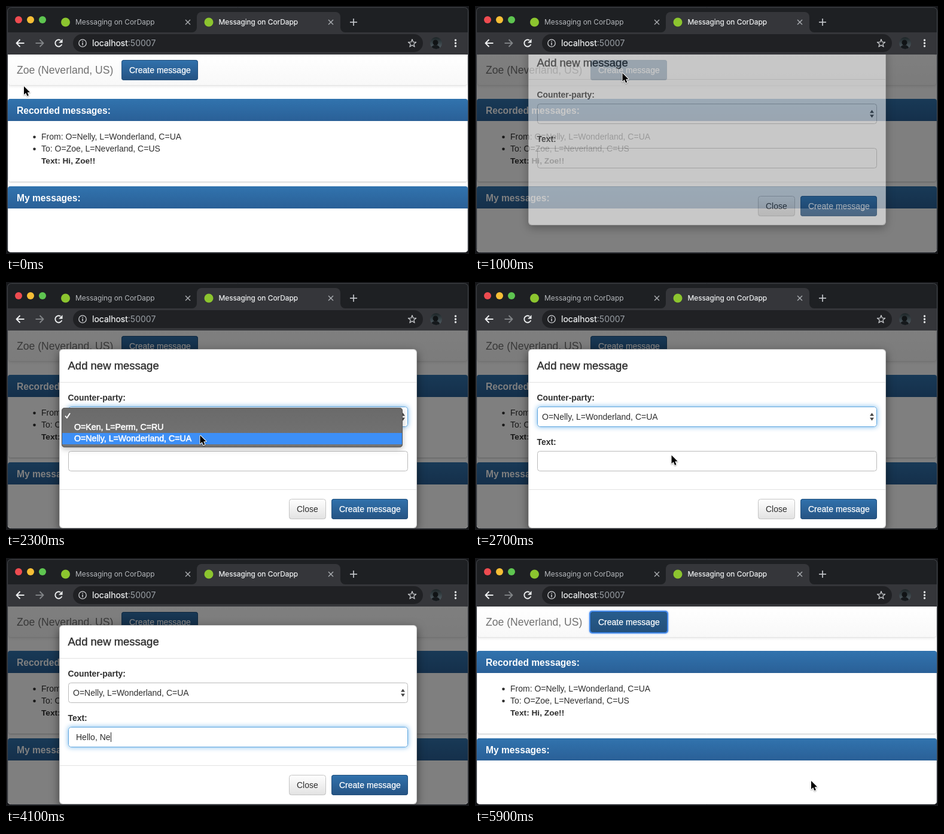
Animation, 774 px wide and 414 px high, one loop 8000 ms. Source, as an HTML page with a canvas:

```html
<!DOCTYPE html>
<html lang="en">
<head>
<meta charset="utf-8">
<title>Messaging</title>
<style>
html, body { margin: 0; width: 100%; height: 100%; overflow: hidden; background: #17181b; }
canvas { display: block; }
</style>
</head>
<body>
<canvas id="stage" width="774" height="414"></canvas>
<script>
const W = 774, H = 414, LOOP = 8000, STEP = 100;
const stage = document.getElementById('stage').getContext('2d');
// Extra height keeps the dialog's shadow whole while it slides
const layer = document.createElement('canvas');
layer.width = W;
layer.height = H + 40;
const overlay = layer.getContext('2d');
let g = stage;

const SANS = '"Liberation Sans", Arial, sans-serif';
const UI = 'Inter, Roboto, sans-serif';
const INK = '#2e2e2e';
const TITLE = 'Messaging on CorDapp';
const PARTIES = ['', 'O=Ken, L=Perm, C=RU', 'O=Nelly, L=Wonderland, C=UA'];
const MESSAGE = 'Hello, Nelly!';
const KEY_TIMES = [3100, 3300, 3400, 3500, 3700, 3800, 3900, 4000, 4100, 4200, 4300, 4500, 4500];

// Pointer path: time, x, y
const PATH = [
  [100, 30, 134], [800, 246.5, 112], [1000, 246.5, 112], [1400, 325.5, 231],
  [1900, 325.5, 231], [2200, 324.5, 256], [2500, 324.5, 256], [2800, 330, 301],
  [5000, 330, 301], [5300, 562, 372]
];

const clamp = v => Math.max(0, Math.min(1, v));
const smooth = p => p * p * (3 - 2 * p);
const easeOut = p => 1 - Math.pow(1 - p, 1.55);

function pointer(t) {
  const i = PATH.findIndex(k => k[0] > t);
  if (i === 0) return PATH[0].slice(1);
  if (i < 0) return PATH[PATH.length - 1].slice(1);
  const [a, b] = [PATH[i - 1], PATH[i]];
  const p = smooth((t - a[0]) / (b[0] - a[0]));
  return [a[1] + (b[1] - a[1]) * p, a[2] + (b[2] - a[2]) * p];
}

function text(s, x, y, font, color, weight = 0) {
  g.font = font;
  g.fillStyle = color;
  g.fillText(s, x, y);
  if (weight) {
    g.strokeStyle = color;
    g.lineWidth = weight;
    g.lineJoin = 'round';
    g.strokeText(s, x, y);
  }
}

function box(x, y, w, h, r, fill, border) {
  if (fill) {
    g.beginPath();
    g.roundRect(x, y, w, h, r);
    g.fillStyle = fill;
    g.fill();
  }
  if (border) {
    g.beginPath();
    g.roundRect(x + 0.5, y + 0.5, w - 1, h - 1, r);
    g.strokeStyle = border;
    g.lineWidth = 1;
    g.stroke();
  }
}

function shadowed(color, blur, dy, paint) {
  g.save();
  g.shadowColor = color;
  g.shadowBlur = blur;
  g.shadowOffsetY = dy;
  paint();
  g.restore();
}

function fade(y, h, top, bottom) {
  const f = g.createLinearGradient(0, y, 0, y + h);
  f.addColorStop(0, top);
  f.addColorStop(1, bottom);
  return f;
}

function disc(x, y, r, color) {
  g.beginPath();
  g.arc(x, y, r, 0, Math.PI * 2);
  g.fillStyle = color;
  g.fill();
}

function line(color, width, ...pts) {
  g.beginPath();
  pts.forEach(([x, y]) => g.lineTo(x, y));
  g.strokeStyle = color;
  g.lineWidth = width;
  g.stroke();
}

function shape(color, ...pts) {
  g.beginPath();
  pts.forEach(([x, y]) => g.lineTo(x, y));
  g.closePath();
  g.fillStyle = color;
  g.fill();
}

function tab(x, closeX, active) {
  disc(x, 27, 7.5, '#8cc52f');
  text(TITLE, x + 16.5, 31, '11.9px ' + UI, active ? '#f1f3f4' : '#b4b7bb', active ? 0.2 : 0);
  line('#a9acb0', 1.4, [closeX - 4, 23], [closeX + 4, 31]);
  line('#a9acb0', 1.4, [closeX + 4, 23], [closeX - 4, 31]);
}

function arrow(x, dir, color) {
  line(color, 1.9, [x - 6.5 * dir, 62], [x + 6.5 * dir, 62]);
  line(color, 1.9, [x + 0.5 * dir, 56], [x + 6.5 * dir, 62], [x + 0.5 * dir, 68]);
}

function star(cx, cy) {
  g.beginPath();
  for (let i = 0; i < 10; i++) {
    const r = i % 2 ? 2.9 : 6.9, a = Math.PI * (i / 5 - 0.5);
    g.lineTo(cx + r * Math.cos(a), cy + r * Math.sin(a));
  }
  g.closePath();
  g.strokeStyle = '#c8cacd';
  g.lineWidth = 1.3;
  g.stroke();
}

function avatar(cx, cy) {
  g.save();
  g.beginPath();
  g.arc(cx, cy, 10, 0, Math.PI * 2);
  g.clip();
  g.fillStyle = fade(cy - 10, 20, '#1c2426', '#56636a');
  g.fillRect(cx - 10, cy - 10, 20, 20);
  disc(cx - 1, cy - 1, 4.5, '#101315');
  disc(cx - 1, cy + 11, 8, '#15191c');
  g.restore();
}

function browser() {
  g.fillStyle = '#17181b';
  g.fillRect(0, 0, W, H);
  box(2, 2, 771, 410, 6, '#1e2023', '#45484d');
  g.fillStyle = '#35363a';
  g.fillRect(3, 44, 769, 37);
  shape('#35363a', [311, 44], [319, 36], [559, 36], [567, 44]);
  disc(311, 36, 8, '#1e2023');
  disc(567, 36, 8, '#1e2023');
  box(319, 10, 240, 34, [8, 8, 0, 0], '#35363a');
  ['#ee4b50', '#f6be36', '#5ec550'].forEach((c, i) => disc(21 + 20 * i, 23, 6, c));
  tab(99.5, 304, false);
  tab(339, 543, true);
  line('#c3c6ca', 1.7, [575, 27], [587, 27]);
  line('#c3c6ca', 1.7, [581, 21], [581, 33]);

  arrow(24, -1, '#f1f3f4');
  arrow(56, 1, '#818487');
  g.beginPath();
  g.arc(88, 62, 5.7, 0.35, 5.3);
  g.strokeStyle = '#f1f3f4';
  g.lineWidth = 1.9;
  g.stroke();
  shape('#f1f3f4', [94.5, 55], [94.5, 61.5], [88, 61.5]);

  box(112, 47, 585, 30, 15, '#202124');
  g.beginPath();
  g.arc(128, 62, 6.2, 0, Math.PI * 2);
  g.strokeStyle = '#d0d2d5';
  g.lineWidth = 1.3;
  g.stroke();
  g.fillStyle = '#d0d2d5';
  g.fillRect(127.3, 61, 1.5, 4.5);
  g.fillRect(127.3, 58.3, 1.5, 1.6);
  const font = '14px ' + UI;
  text('localhost', 144, 67, font, '#f1f3f4', 0.2);
  text(':50007', 144 + g.measureText('localhost').width, 67, font, '#9aa0a6');
  star(679, 62.5);
  avatar(719, 62);
  [57, 62, 67].forEach(y => disc(751.5, y, 1.7, '#eceef0'));
}

function primary(x, y, dark) {
  const fill = dark ? fade(y, 34, '#275d8d', '#234f7a') : fade(y, 34, '#3172ad', '#255383');
  box(x, y, 128, 34, 4, fill, '#23507c');
  text('Create message', x + 13, y + 22, '14px ' + SANS, '#fff', 0.25);
}

function panel(y, h, title) {
  shadowed('rgba(0,0,0,.12)', 2, 1, () => box(3, y, 769, h, 4, '#fff'));
  box(3, y, 769, h, 4, null, '#d6d8da');
  box(3, y, 769, 37, [4, 4, 0, 0], fade(y, 37, '#3173ae', '#2a6097'));
  text(title, 18, y + 25, 'bold 15.6px ' + SANS, '#fff');
}

function page(t) {
  g.fillStyle = '#fff';
  g.fillRect(0, 81, W, 333);
  shadowed('rgba(0,0,0,.1)', 4, 1, () => box(3, 81, 769, 52, 4, fade(81, 52, '#fff', '#f8f8f8')));
  box(3, 80, 769, 53, 4, null, '#e4e4e4');
  text('Zoe (Neverland, US)', 18, 113, '17.6px ' + SANS, '#707070');
  const focused = t >= 5800;
  if (focused) {
    shadowed('rgba(59,134,240,.8)', 3, 0, () => box(191, 88, 132, 38, 5, '#4288e8'));
  }
  primary(193, 90, focused || (t >= 700 && t < 1100));

  panel(155, 139, 'Recorded messages:');
  const font = '14px ' + SANS;
  disc(47.5, 218.7, 2.3, INK);
  disc(47.5, 238.7, 2.3, INK);
  text('From: ' + PARTIES[2], 59, 223, font, INK);
  text('To: O=Zoe, L=Neverland, C=US', 59, 243, font, INK);
  text('Text: Hi, Zoe!!', 59, 263, 'bold 13.7px ' + SANS, INK);
  panel(301, 130, 'My messages:');
}

function field(y, focused) {
  if (focused) {
    shadowed('rgba(102,175,233,.9)', 8, 0, () => box(104, y, 568, 34, 4, '#fff'));
  }
  box(104, y, 568, 34, 4, '#fff', focused ? '#5fa6df' : '#bababa');
}

function modal(t) {
  const bold = 'bold 13.9px ' + SANS, font = '14px ' + SANS;
  shadowed('rgba(0,0,0,.5)', 15, 5, () => box(89, 112, 598, 299, 6, '#fff'));
  box(89, 112, 598, 299, 6, null, 'rgba(0,0,0,.2)');
  text('Add new message', 103.5, 146, '18.5px ' + SANS, INK, 0.4);
  g.fillStyle = '#e2e2e2';
  g.fillRect(90, 167, 596, 1);
  g.fillRect(90, 346, 596, 1);

  text('Counter-party:', 103.5, 198, bold, INK);
  field(208, t >= 1200 && t < 2900);
  if (t >= 2600) text(PARTIES[2], 112, 230, font, INK);
  shape('#444', [660, 223.5], [663.5, 218.5], [667, 223.5]);
  shape('#444', [660, 226.5], [663.5, 231.5], [667, 226.5]);

  text('Text:', 103.5, 272, bold, INK);
  field(282, t >= 2900 && t < 5400);
  const typed = MESSAGE.slice(0, KEY_TIMES.filter(k => k <= t).length);
  text(typed, 117, 304, font, INK);
  if (t >= 2900 && t < 4900) {
    g.fillStyle = '#222';
    g.fillRect(Math.round(117 + g.measureText(typed).width), 291, 1, 16);
  }

  box(473, 362, 62, 34, 4, fade(362, 34, '#fff', '#e2e2e2'), '#c4c4c4');
  text('Close', 486, 384, font, INK);
  primary(544, 362, t >= 5300);
}

function dropdown(y) {
  const row = y < 233 ? 0 : y < 252 ? 1 : 2;
  shadowed('rgba(0,0,0,.25)', 10, 3, () => box(93, 210, 570, 66, 5, '#6c6c6c'));
  box(93, 210, 570, 66, 5, fade(210, 66, '#6a6a6a', '#747474'), '#565656');
  g.fillStyle = '#3d8ff6';
  g.fillRect(94, 252 + (row - 2) * 19, 568, 19);
  line('#fff', 2, [99, 223.5], [101.8, 227], [107, 219]);
  PARTIES.forEach((s, i) => text(s, 114, 228 + i * 19, '14.2px ' + SANS, '#fff', 0.55));
}

function suggestion() {
  shadowed('rgba(0,0,0,.4)', 5, 1, () => box(103, 317, 192, 52, 4, '#242428'));
  box(103, 317, 192, 52, 4, null, '#37373c');
  text('Have a wonderful day!', 115, 348, '500 12.6px ' + UI, '#e6e7e9');
}

function cursor(x, y) {
  const pts = [[0, 0], [0, 14], [3.2, 11], [5.5, 16.3], [7.9, 15.3], [5.7, 10.2], [10, 10]];
  g.save();
  g.translate(x, y);
  g.lineJoin = 'round';
  shadowed('rgba(0,0,0,.35)', 2, 1, () => line('#fff', 2, ...pts, [0, 0]));
  shape('#000', ...pts);
  g.restore();
}

function draw(t) {
  const opening = t - 915, closing = t - 5410;
  const alpha = clamp(opening / 150) * (1 - clamp(closing / 150));
  const shift = -75 * (1 - easeOut(clamp(opening / 300)) + easeOut(clamp(closing / 300)));
  const dim = 0.5 * clamp((t - 900) / 100) * (1 - clamp((t - 5610) / 150));
  const [x, y] = pointer(t);

  browser();
  g.save();
  g.beginPath();
  g.roundRect(3, 81, 769, 330, [0, 0, 5, 5]);
  g.clip();
  page(t);
  g.fillStyle = `rgba(0,0,0,${dim})`;
  g.fillRect(0, 81, W, 333);
  if (alpha > 0) {
    g = overlay;
    g.clearRect(0, 0, W, layer.height);
    modal(t);
    g = stage;
    g.globalAlpha = alpha;
    g.drawImage(layer, 0, Math.round(shift));
  }
  g.restore();

  if (t >= 1900 && t < 2600) dropdown(y);
  if (t >= 3100 && t < 3300) suggestion();
  if (t < 3100 || t > 5000) cursor(x, y);
}

const start = performance.now();
function tick() {
  const t = (performance.now() - start) % LOOP;
  draw(Math.floor(t / STEP) * STEP);
  requestAnimationFrame(tick);
}
tick();
</script>
</body>
</html>
```
